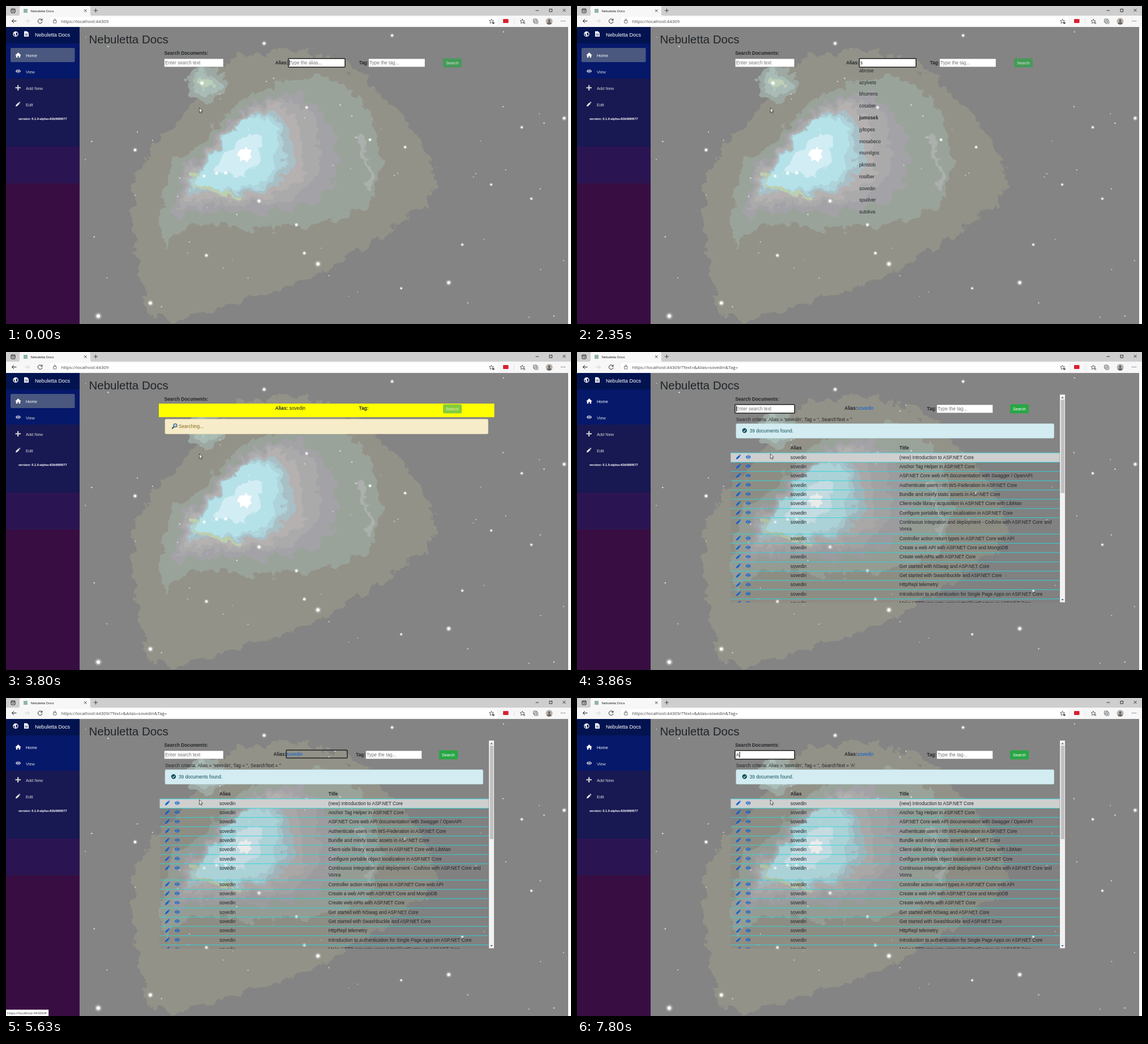
An HTML page for the animation above (8 s loop, 998x561 px).

```html
<!DOCTYPE html>
<html lang="en">
<head>
<meta charset="utf-8">
<title>Nebuletta Docs</title>
<style>
html, body { margin: 0; width: 100%; height: 100%; overflow: hidden; background: #848484; }
svg { display: block; width: 998px; height: 561px; }
text { font: 8.26px "Liberation Sans", Arial, sans-serif; fill: #212529; white-space: pre; }
.ui { font-family: "Open Sans", "Noto Sans", sans-serif; }
.b { font-weight: 700; }
</style>
</head>
<body>
<svg id="stage" viewBox="0 0 998 561" xmlns="http://www.w3.org/2000/svg">
  <defs>
    <filter id="ragged" filterUnits="userSpaceOnUse" x="130" y="37" width="863" height="524" color-interpolation-filters="sRGB">
      <feTurbulence type="fractalNoise" baseFrequency=".045" numOctaves="5" seed="7"/>
      <feDisplacementMap in="SourceGraphic" scale="34" xChannelSelector="R" yChannelSelector="G"/>
    </filter>
    <radialGradient id="glow">
      <stop offset="0" stop-color="#fff"/><stop offset=".35" stop-color="#fff"/>
      <stop offset=".5" stop-color="#fff" stop-opacity=".35"/><stop offset="1" stop-color="#fff" stop-opacity="0"/>
    </radialGradient>
    <clipPath id="panel"><rect x="270" y="75" width="592" height="366.5"/></clipPath>
    <path id="pencil" d="M-4 4 L-3.5 1.4 L1 -3 L3.1 -.9 L-1.4 3.5 Z M1.6 -3.5 L2.4 -4.2 Q2.9 -4.5 3.4 -4 L4 -3.4 Q4.5 -2.9 4.1 -2.3 L3.6 -1.6 Z"/>
    <path id="eye" fill-rule="evenodd" d="M-4.6 0 Q-2.6 -3.2 0 -3.2 Q2.6 -3.2 4.6 0 Q2.6 3.2 0 3.2 Q-2.6 3.2 -4.6 0 Z M0 -2.4 A2.4 2.4 0 1 0 .01 -2.4 Z M0 -1.4 A1.4 1.4 0 1 1 -.01 -1.4 Z"/>
    <path id="star" d="M0 -4 L1.1 -1.3 L4 -1.1 L1.8 .8 L2.5 3.6 L0 2.1 L-2.5 3.6 L-1.8 .8 L-4 -1.1 L-1.1 -1.3 Z"/>
  </defs>
</svg>
<script>
const LOOP = 8000;
const NAME = 'Nebuletta Docs';
const USER = 'sovedin';
const BLUE = '#0b5fd0', GREY = '#757575';
const stage = document.getElementById('stage');

function add(parent, tag, attrs = {}, str) {
  const el = document.createElementNS('http://www.w3.org/2000/svg', tag);
  for (const k in attrs) el.setAttribute(k, attrs[k]);
  if (str !== undefined) el.textContent = str;
  return parent.appendChild(el);
}
const group = (p, attrs) => add(p, 'g', attrs);
const rect = (p, x, y, width, height, fill, more) => add(p, 'rect', { x, y, width, height, fill, ...more });
const dot = (p, cx, cy, r, fill, more) => add(p, 'circle', { cx, cy, r, fill, ...more });
const line = (p, d, stroke, w = 1) => add(p, 'path', { d, stroke, 'stroke-width': w, fill: 'none' });
const shape = (p, d, fill) => add(p, 'path', { d, fill });
const icon = (p, id, x, y, more) => add(p, 'use', { href: '#' + id, transform: `translate(${x} ${y})`, ...more });
function text(p, x, y, str, o = {}) {
  const el = add(p, 'text', { x, y, class: o.cls || '' }, str);
  if (o.size) el.style.fontSize = o.size + 'px';
  if (o.fill) el.style.fill = o.fill;
  return el;
}

// Stepped animation: list of [time, value], first time is 0
function track(el, prop, list) {
  const keys = list.map(([t, v]) => ({ offset: t / LOOP, [prop]: v, easing: 'step-end' }));
  keys.push({ offset: 1, [prop]: list[list.length - 1][1] });
  el.animate(keys, { duration: LOOP, iterations: Infinity });
}
// Visible only in the given [from, to] spans
function show(el, ...spans) {
  const list = spans[0][0] ? [[0, 0]] : [];
  for (const [a, b] of spans) {
    list.push([a, 1]);
    if (b < LOOP) list.push([b, 0]);
  }
  track(el, 'opacity', list);
}

/* Sky: nested contours between a few key outlines */
const outline = str => str.split(' ').map(p => p.split(',').map(Number));
const core = outline('345,280 385,252 403,214 425,197 457,190 474,215 479,250 475,285 455,310 420,322 375,322 345,318 328,305');
const veil = outline('280,285 345,248 385,195 440,152 520,120 610,140 664,215 660,345 570,385 450,398 350,385 300,400 270,445');
const edge = outline('212,300 290,215 325,180 370,88 560,75 650,140 735,230 770,340 650,415 520,490 360,535 290,560 245,545');
const heart = core.map(() => [412, 264]);
const mix = (a, b, t) => a.map((p, i) => p.map((v, k) => v + (b[i][k] - v) * t));
function blob(p, fill, pts) {
  const mid = (a, b) => [(a[0] + b[0]) / 2, (a[1] + b[1]) / 2];
  const next = i => pts[(i + 1) % pts.length];
  const d = pts.map((q, i) => `Q${q} ${mid(q, next(i))}`).join('');
  shape(p, `M${mid(pts[pts.length - 1], pts[0])}${d}Z`, fill);
}
rect(stage, 130, 37, 868, 524, '#848484');
const sky = group(stage, { filter: 'url(#ragged)' });
blob(sky, '#939288', edge);
blob(sky, '#9aa39a', veil);
[[.58, '#a3a2a6'], [.42, '#abaaab'], [.28, '#b4b1b0'], [.16, '#a9bfc6'], [.07, '#aed3da']]
  .forEach(([t, c]) => blob(sky, c, mix(core, veil, t)));
line(sky, 'M328 292 Q332 328 412 334', '#bccfae', 8);
blob(sky, '#b5e2e8', core);
blob(sky, '#d3edf4', mix(heart, core, .58));
[[33, '#9da8a2'], [23, '#a9bbb5'], [13, '#bccfb8']]
  .forEach(([r, c]) => dot(sky, 351, 137, r, c));
line(sky, 'M624 228 Q640 270 646 325', '#abb0ad', 10);
shape(stage, 'M412 255 L417 252 L420 254 L424 248 L427 253 L434 254 L431 261 L434 267 L429 270 L426 276 L420 271 L413 274 L414 267 L408 263 Z', '#fff');

// Stars, brightest first
outline('163,547 551,455 255,524 782,488 388,294 346,136 447,344 456,66 986,198 228,254 372,295 354,440 513,386 527,436 350,300 682,52 531,179 643,236 705,249 911,214 806,421 928,340 857,315 698,498')
  .forEach(([x, y], i) => dot(stage, x, y, 7.5 - 4 * Math.sqrt(i / 23), 'url(#glow)'));
let seed = 11;
const rnd = () => (seed = seed * 16807 % 2147483647) / 2147483647;
for (let i = 0; i < 55; i++) dot(stage, 140 + rnd() * 845, 45 + rnd() * 505, .7 + rnd() * .6, '#dfe1e1');
rect(stage, 993, 37, 5, 524, '#fff');

/* Browser frame */
const thin = { fill: 'none', stroke: '#444', 'stroke-width': .8 };
rect(stage, 0, 0, 998, 18, '#cecece');
shape(stage, 'M21 18 Q24 17 24 14 V3 Q24 0 27 0 H146 Q149 0 149 3 V14 Q149 17 152 18 Z', '#f7f7f7');
rect(stage, 0, 17, 998, 20, '#f7f7f7');
rect(stage, 78, 19.5, 790, 15, '#fff', { rx: 2 });
rect(stage, 9, 5, 7, 7, 'none', { rx: 1, stroke: '#222' });
line(stage, 'M9 7 H16 M11.5 9.5 H14', '#222', 1.2);
rect(stage, 31, 5, 7, 7, '#8fb5ac');
text(stage, 43.5, 10.6, NAME, { size: 6 });
line(stage, 'M138 6 L142.5 10.5 M142.5 6 L138 10.5', '#333', .9);
line(stage, 'M155 8 H162 M158.5 4.5 V11.5', '#333', .9);
line(stage, 'M935.5 8 H941 M983.5 5 L988.5 10 M988.5 5 L983.5 10', '#222', .9);
rect(stage, 960, 5.5, 4.5, 4.5, 'none', { stroke: '#222', 'stroke-width': .9 });
line(stage, 'M18.5 26.5 H10.5 M14 23 L10.5 26.5 L14 30', '#222');
line(stage, 'M33.5 26.5 H41.5 M38 23 L41.5 26.5 L38 30', '#d0d0d0');
line(stage, 'M63.4 24.5 A3.8 3.8 0 1 0 64 27.4 M64 22.5 V25.2 H61.2', '#222');
rect(stage, 83.5, 25.5, 5.5, 4.5, 'none', { rx: .8, ...thin });
line(stage, 'M84.8 25.5 V24.4 A1.5 1.5 0 0 1 87.8 24.4 V25.5', '#555', .8);
const urlStyle = { cls: 'ui', size: 7.8, fill: '#444' };
const home = 'https://localhost:44309';
show(text(stage, 97.5, 29.8, home, urlStyle), [0, 3860]);
show(text(stage, 97.5, 29.8, `${home}/?Text=&Alias=${USER}&Tag=`, urlStyle), [3860, LOOP]);
icon(stage, 'star', 857.5, 27, thin);
dot(stage, 861, 30, 1.8, '#555');
rect(stage, 878, 23, 9.5, 7, '#d9202e', { rx: 1 });
line(stage, 'M897.5 22 V32', '#ddd', .7);
icon(stage, 'star', 912, 27, thin);
line(stage, 'M914 29 H917 M915 31 H917', '#444', .9);
rect(stage, 931.5, 23, 6, 6, 'none', { ...thin, rx: 1 });
rect(stage, 933.5, 25, 6, 6, '#f7f7f7', { ...thin, rx: 1, fill: '#f7f7f7' });
line(stage, 'M935 28 H938 M936.5 26.5 V29.5', '#333', .8);
dot(stage, 959.5, 27, 6, '#b9b3ad');
shape(stage, 'M955.2 31 Q956 28.5 959.5 28.5 Q963 28.5 963.8 31 A6 6 0 0 1 955.2 31 Z M957.5 26 A2 2.4 0 1 0 961.5 26 A2 2.4 0 1 0 957.5 26 Z', '#6d6460');
for (const x of [981, 984, 987]) dot(stage, x, 26.5, .7, '#333');

/* Sidebar */
[[37, '#021350'], [66, '#05186a'], [128, '#181852'], [248, '#2a1552'], [313, '#380e42']]
  .forEach(([y, c]) => rect(stage, 0, y, 130, 561 - y, c));
dot(stage, 17, 49.5, 4, 'none', { stroke: '#fff', 'stroke-width': 1.4 });
shape(stage, 'M13.5 47 Q16 45 19 46.5 L17 49 L18.5 51 L17 53.5 L15.5 50.5 Z', '#fff');
shape(stage, 'M32 44.5 H37 L40 47.5 V54 H32 Z', '#fff');
line(stage, 'M33.5 49.5 H38.5 M33.5 51.7 H38.5', '#021350', .8);
text(stage, 51, 54, NAME, { size: 9.08, fill: '#fff' });
show(rect(stage, 8, 74, 113.5, 25, '#4a577f', { rx: 2 }), [0, 3860]);
['Home', 'View', 'Add New', 'Edit'].forEach((s, i) =>
  text(stage, 35, 89.5 + i * 29.1, s, { size: 7.43, fill: i ? '#d7d7d7' : '#fff' }));
shape(stage, 'M16.2 87 L21.5 82 L26.8 87 H25.2 V91 H22.6 V88 H20.4 V91 H17.8 V87 Z', '#fff');
icon(stage, 'eye', 21.5, 115, { fill: '#e4e4e4' });
line(stage, 'M16.5 144.3 H26 M21.2 139.5 V149', '#d7d7d7', 2.1);
icon(stage, 'pencil', 21, 173.2, { fill: '#e4e4e4' });
text(stage, 22, 201, 'version: 0.1.0-alpha+63b569f077', { cls: 'b', size: 5.6, fill: '#fff' });

/* Shared page parts */
text(stage, 146.5, 66, NAME, { size: 20.5 });
const label = (p, x, y, s) => text(p, x, y, s, { cls: 'b' });
const ring = (p, x, y, w, h) => rect(p, x, y, w, h, 'none', { rx: 1.2, stroke: '#101010', 'stroke-width': 1.3 });
const focus = (p, x, w = 99.5) => ring(p, x - .4, 92.7, w + .8, 15.1);
const caret = (p, x) => rect(p, x, 95, 1, 10, '#000');
const hold = (p, x, s) => text(p, x, 103, s, { fill: GREY });
const field = (p, x, w = 99.5) => rect(p, x, 93, w, 14.6, '#fff', { stroke: '#767676', 'stroke-width': .5 });
function button(p, x, fill, ink) {
  rect(p, x, 92.3, 33, 16, fill, { rx: 2 });
  text(p, x + 5, 103, 'Search', { size: 7.22, fill: ink });
}
label(stage, 279.5, 86, 'Search Documents:');

/* Choosing an alias */
const pick = group(stage);
show(pick, [0, 3800]);
field(pick, 279.5, 104.5);
hold(pick, 281, 'Enter search text');
label(pick, 475.5, 102.6, 'Alias:');
field(pick, 499);
focus(pick, 499);
show(hold(pick, 500.5, 'Type the alias...'), [0, 790]);
show(text(pick, 500.5, 103, 's'), [790, 3800]);
show(caret(pick, 500), [0, 530]);
show(caret(pick, 504.2), [790, 1310], [1830, 2350], [2870, 3400]);
label(pick, 623.5, 102.6, 'Tag:');
field(pick, 640.5);
hold(pick, 642, 'Type the tag...');
button(pick, 772, '#459a58', '#d8ebdc');
const list = group(pick);
show(list, [850, 3800]);
const aliases = ['abrose', 'azylvets', 'bhurrens', 'cosaber', 'jumosek', 'jyltopes', 'mosabeco',
  'mumilgos', 'pkristob', 'rosilber', USER, 'spudver', 'sutokva'];
// Two key presses, then the held key repeats, then one last press
const picks = [1370, 1630, 2030, 2160, 2290];
for (let t = 2480; t <= 3000; t += 130) picks.push(t);
picks.push(3200);
aliases.forEach((s, i) => {
  const el = text(list, 498.5, 116.9 + i * 20.77, s);
  if (i >= picks.length) return;
  const end = picks[i + 1] || LOOP;
  track(el, 'fontWeight', [[0, 400], [picks[i], 700], [end, end < LOOP ? 400 : 700]]);
});

/* Searching */
const busy = group(stage);
show(busy, [3800, 3860]);
rect(busy, 270, 91, 592.5, 24, '#ff0');
label(busy, 475.5, 101.5, 'Alias:');
text(busy, 500.5, 101.5, USER);
label(busy, 623.5, 101.5, 'Tag:');
button(busy, 772, '#86cb3c', '#eef7c8');
rect(busy, 281, 118.5, 570.5, 26, '#f6ecc9', { rx: 2, stroke: '#f3e5b4', 'stroke-width': .6 });
line(busy, 'M296.5 132 L293.3 135.3', '#3b4045', 2);
dot(busy, 299, 129.5, 3, '#a9d3ea', { stroke: '#3b5566', 'stroke-width': 1.2 });
text(busy, 305, 134, 'Searching...', { fill: '#85691a' });

/* Results */
const found = group(stage, { 'clip-path': 'url(#panel)' });
show(found, [3860, LOOP]);
field(found, 279.5, 104.5);
show(focus(found, 279.5, 104.5), [3860, 5380], [6960, LOOP]);
show(hold(found, 281, 'Enter search text'), [3860, 7800]);
show(text(found, 281, 103, 'A'), [7800, LOOP]);
show(caret(found, 281), [3860, 4390], [4920, 5380], [6960, 7470]);
show(caret(found, 286.8), [7800, LOOP]);
label(found, 472.5, 101.5, 'Alias:');
text(found, 495.5, 101.5, USER, { fill: BLUE });
show(ring(found, 495, 91.8, 107.8, 14), [5380, 6960]);
label(found, 618, 102.6, 'Tag:');
field(found, 635.5, 99);
hold(found, 637, 'Type the tag...');
button(found, 765, '#28a745', '#fff');
const criteria = s => text(found, 281, 122.4, `Search criteria: Alias = '${USER}', Tag = '', SearchText = '${s}'`);
show(criteria(''), [3860, 7800]);
show(criteria('A'), [7800, LOOP]);
rect(found, 281, 126.5, 561.5, 25.5, '#d3ecf2', { rx: 2, stroke: '#bfe3ea', 'stroke-width': .6 });
dot(found, 296, 138.6, 4.2, '#0c4a55');
line(found, 'M293.8 138.8 L295.4 140.4 L298.3 137', '#d3ecf2', 1.1);
text(found, 305, 142, '39 documents found.', { fill: '#17505a' });
label(found, 377, 172.4, 'Alias');
label(found, 569.5, 172.4, 'Title');

const titles = [
  '(new) Introduction to ASP.NET Core',
  'Anchor Tag Helper in ASP.NET Core',
  'ASP.NET Core web API documentation with Swagger / OpenAPI',
  'Authenticate users with WS-Federation in ASP.NET Core',
  'Bundle and minify static assets in ASP.NET Core',
  'Client-side library acquisition in ASP.NET Core with LibMan',
  'Configure portable object localization in ASP.NET Core',
  'Continuous integration and deployment - CodVox with ASP.NET Core and|Vonra',
  'Controller action return types in ASP.NET Core web API',
  'Create a web API with ASP.NET Core and MongoDB',
  'Create web APIs with ASP.NET Core',
  'Get started with NSwag and ASP.NET Core',
  'Get started with Swashbuckle and ASP.NET Core',
  'HttpRepl telemetry',
  'Introduction to authentication for Single Page Apps on ASP.NET Core',
  'Make HTTP requests using IHttpClientFactory in ASP.NET Core'
];
rect(found, 271.5, 178, 581, 264, '#707274', { opacity: .14 });
rect(found, 271.5, 178, 581, 16.4, '#cfcfcf');
let y = 178;
for (const title of titles) {
  const parts = title.split('|');
  line(found, `M271.5 ${y} H852.5`, '#2bd9de', .9);
  icon(found, 'pencil', 285, y + 7.3, { fill: BLUE });
  icon(found, 'eye', 302.5, y + 7.2, { fill: BLUE });
  text(found, 377, y + 10.5, USER);
  parts.forEach((s, i) => text(found, 569.5, y + 10.5 + i * 12.4, s));
  y += 16.35 + (parts.length - 1) * 12.4;
}
rect(found, 853, 75, 9, 366.5, '#f1f1f1');
rect(found, 854.5, 84, 6.5, 165, '#c1c1c1');
shape(found, 'M855.5 81.5 L857.6 79 L859.7 81.5 Z M855.5 436 L857.6 438.5 L859.7 436 Z', '#505050');

/* Link hint in the corner */
const hint = group(stage);
rect(hint, -1, 550, 76, 12, '#fff', { stroke: '#c8c8c8', 'stroke-width': .6 });
text(hint, 2, 557.8, home + '/#', { cls: 'ui', size: 5.95, fill: '#333' });
track(hint, 'opacity', [[0, 0], [5460, .33], [5550, .67], [5630, 1], [7290, .67], [7350, .33], [7410, 0]]);

/* Pointer */
add(stage, 'path', { d: 'M341.5 179.5 V188 L343.4 186.3 L344.8 189.3 L346.2 188.6 L344.9 185.8 H347.4 Z', fill: '#fff', stroke: '#111', 'stroke-width': .7 });
</script>
</body>
</html>
```
